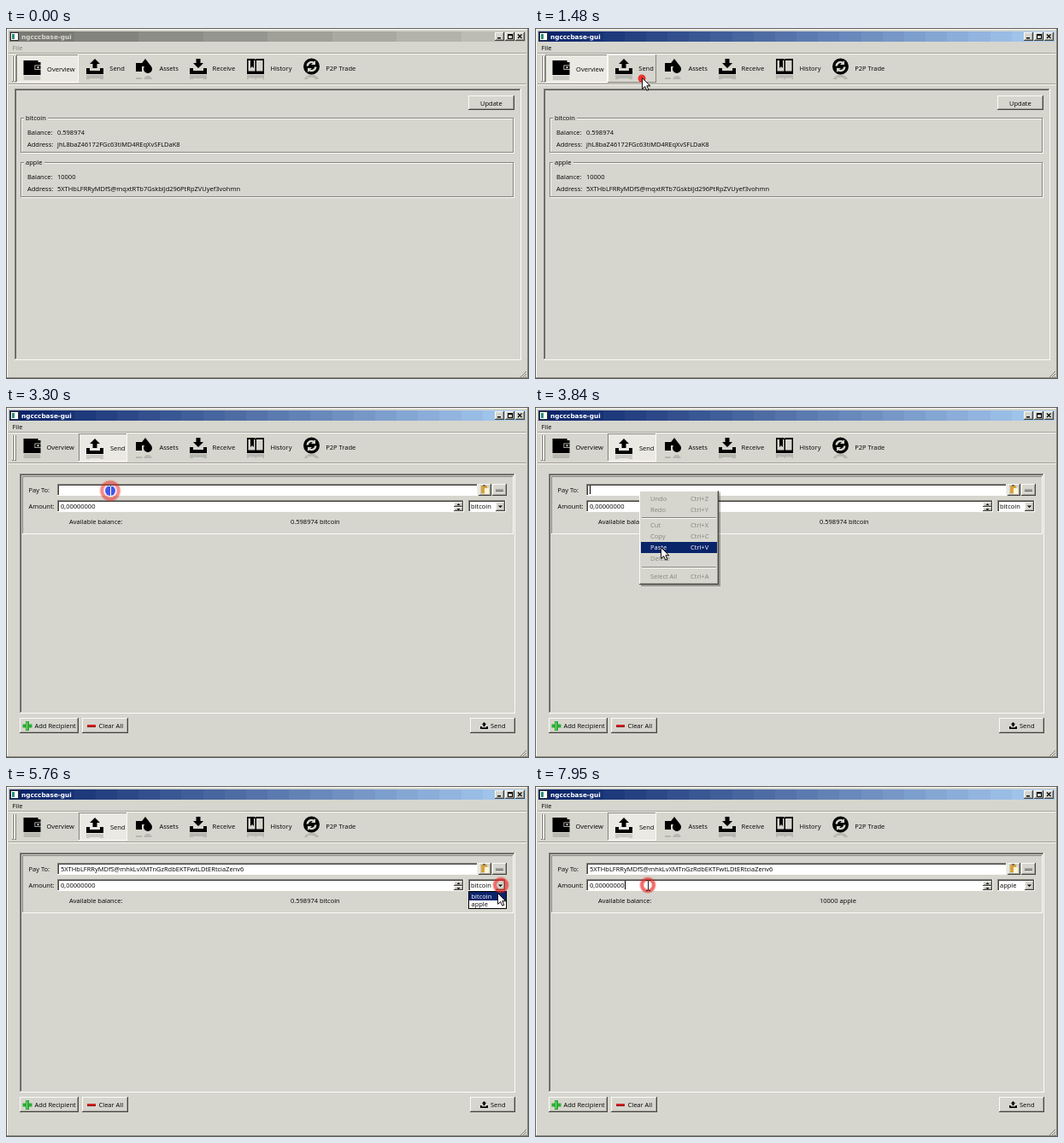
An HTML page with a canvas for the animation above (8000 ms loop, 612 by 411 pixels).

```html
<!DOCTYPE html>
<html lang="en">
<head>
<meta charset="utf-8">
<title>Wallet demo</title>
<style>
html, body { margin: 0; width: 100%; height: 100%; overflow: hidden; background: #d6d6ce; }
canvas { display: block; }
</style>
</head>
<body>
<canvas id="stage" width="612" height="411"></canvas>
<script>
const ctx = document.getElementById('stage').getContext('2d');
const LOOP = 8000;
const FACE = '#d6d6ce', DARK = '#85847d', LIGHT = '#fbfbf7', NAVY = '#0a246a', INK = '#000';
const FONT = '7.5px "Open Sans", "Noto Sans", sans-serif';
const TITLE_FONT = 'bold 7.3px "DejaVu Sans", sans-serif';

const ADDRESSES = {
  bitcoin: 'jhL8baZ46172FGc63tiMD4REqXvSFLDaK8',
  apple: '5XTHbLFRRyMDfS@mqxtRTb7GskbiJd296PtRpZVUyef3vohmn',
  payee: '5XTHbLFRRyMDfS@mhkLvXMTnGzRdbEKTFwtLDtERtciaZenv6'
};

// Moments at which the interface changes, in ms
const AT = { enter: 500, hover: 1160, activate: 1420, sendPage: 1540, menu: 3360,
  paste: 4160, popup: 5640, pick: 6640, amount: 7790 };

const TRAY = 'M0 11h4v3h12v-3h4v7H0z';
const ICONS = {
  wallet: 'M0 1h17v2h3v15H0z M13 6.5h7v.7h-6.2v4H20v.7h-7z M16 8.2h2v2h-2z',
  send: TRAY + 'M10 0L16 6H12.5V11H7.5V6H4z',
  assets: 'M0 5h7v10H0z M11 0l7 9H4z M9 12a5 5 0 0 1 10 0a5 5 0 0 1-10 0z',
  receive: TRAY + 'M7.5 0h5v5H16L10 11 4 5h3.5z',
  history: 'M0 0h9l1 1 1-1h9v18H0z M1.5 2h8v12.5h-8z M11 2h7.5v12.5H11z M4 2h4v9l-2-2-2 2z',
  trade: 'M0.5 9a9.5 9.5 0 0 1 19 0a9.5 9.5 0 0 1-19 0z' +
    'M4 8.5a6 6 0 0 1 9-5l1.5-1.5v5h-5l1.8-1.8a3.6 3.6 0 0 0-4.8 3.3z' +
    'M16 9.5a6 6 0 0 1-9 5l-1.5 1.5v-5h5l-1.8 1.8a3.6 3.6 0 0 0 4.8-3.3z'
};
const SOLID_ICONS = ['assets', 'send', 'receive'];
for (const name in ICONS) ICONS[name] = new Path2D(ICONS[name]);
const ARROW = new Path2D('M0 0V12.8L3.2 10 5.3 14.6 7.3 13.7 5.3 9.2H9.2z');

const TOOLS = [
  ['wallet', 20.5, 'Overview', 47.5], ['send', 94, 'Send', 121.3], ['assets', 152, 'Assets', 179.4],
  ['receive', 215, 'Receive', 241.6], ['history', 282, 'History', 309.4], ['trade', 347.5, 'P2P Trade', 374.3]
];

// Pointer stops: time, x, y
const PATH = [
  [500, 326, 384], [1220, 125, 58], [1900, 125, 58], [2200, 300, 76], [2560, 215, 106],
  [2900, 122, 98], [3500, 122, 98], [3900, 149, 168], [4480, 149, 168], [4560, 157, 165],
  [4740, 489, 120], [5160, 590, 124], [5460, 579, 116], [5600, 579, 116], [5760, 575, 125],
  [6120, 570, 134], [6560, 569, 135], [6860, 569, 135], [6920, 566, 136], [7160, 240, 148],
  [7560, 132, 116]
];

// Clicks: time, x, y, colour
const RED = '236,36,32', BLUE = '24,48,232';
const CLICKS = [
  [1420, 125, 59, RED], [2990, 122, 98, RED], [3180, 122, 98, BLUE], [4080, 149, 168, RED],
  [5560, 579, 116, RED], [6580, 569, 135, RED], [7750, 132, 116, RED]
];

function rect(x, y, w, h, color) {
  ctx.fillStyle = color;
  ctx.fillRect(x, y, w, h);
}

function text(label, x, y, color = INK, font = FONT) {
  ctx.font = font;
  ctx.fillStyle = color;
  ctx.fillText(label, x, y);
}

function bevel(x, y, w, h, topLeft, bottomRight, fill) {
  if (fill) rect(x, y, w, h, fill);
  rect(x, y, w, 1, topLeft);
  rect(x, y, 1, h, topLeft);
  rect(x, y + h - 1, w, 1, bottomRight);
  rect(x + w - 1, y, 1, h, bottomRight);
}

function button(x, y, w, h) {
  bevel(x, y, w, h, LIGHT, '#45443f', FACE);
  rect(x + 1, y + h - 2, w - 2, 1, '#a3a29b');
  rect(x + w - 2, y + 1, 1, h - 2, '#a3a29b');
}

function field(x, y, w, h) {
  bevel(x, y, w, h, DARK, LIGHT, '#fff');
  rect(x + 1, y + 1, w - 2, 1, '#44423f');
  rect(x + 1, y + 1, 1, h - 2, '#44423f');
}

function triangle(x, y, size, direction) {
  ctx.fillStyle = INK;
  ctx.beginPath();
  ctx.moveTo(x - size, y);
  ctx.lineTo(x + size, y);
  ctx.lineTo(x, y + size * direction);
  ctx.fill();
}

function icon(name, x, y, scale = 1) {
  ctx.save();
  ctx.translate(x, y);
  ctx.scale(scale, scale);
  ctx.fillStyle = INK;
  ctx.fill(ICONS[name], SOLID_ICONS.includes(name) ? 'nonzero' : 'evenodd');
  ctx.restore();
}

function reflectedIcon(name, x, y) {
  icon(name, x, y);
  ctx.save();
  ctx.beginPath();
  ctx.rect(x, y + 18, 20, 6);
  ctx.clip();
  ctx.globalAlpha = 0.14;
  ctx.translate(0, 2 * y + 37);
  ctx.scale(1, -1);
  icon(name, x, y);
  ctx.restore();
}

function titleBar(active) {
  const from = active ? [10, 36, 106] : [122, 122, 117];
  const to = active ? [166, 202, 240] : [188, 188, 180];
  const bands = active ? 24 : 8;
  for (let i = 0; i < bands; i++) {
    const p = i / (bands - 1);
    const mix = from.map((c, k) => Math.round(c + (to[k] - c) * p));
    const left = Math.round(4 + 604 * i / bands);
    rect(left, 4, Math.round(4 + 604 * (i + 1) / bands) - left, 12, `rgb(${mix})`);
  }
  bevel(5, 5, 10, 10, '#333', '#333', '#fff');
  rect(7, 7, 3, 6, '#2b8a78');
  text('ngcccbase-gui', 18, 12.8, active ? '#fff' : '#d8d6ce', TITLE_FONT);
  [572, 584, 596].forEach(x => button(x, 5, 11, 10));
  rect(575, 11, 4, 1.5, INK);
  bevel(587, 7, 6, 6, INK, INK);
  rect(587, 7, 6, 2, INK);
  ctx.strokeStyle = INK;
  ctx.lineWidth = 1.2;
  ctx.beginPath();
  ctx.moveTo(599, 7.5); ctx.lineTo(603.5, 12);
  ctx.moveTo(603.5, 7.5); ctx.lineTo(599, 12);
  ctx.stroke();
}

function windowFrame(t) {
  const active = t >= AT.activate;
  rect(0, 0, 612, 411, FACE);
  bevel(0, 0, 612, 411, '#5e5d59', '#5e5d59');
  bevel(1, 1, 610, 409, LIGHT, DARK);
  titleBar(active);
  text('File', 7.5, 26, active ? INK : DARK);
  for (const y of [29, 65]) {
    rect(3, y, 606, 1, '#a39c94');
    rect(3, y + 1, 606, 1, LIGHT);
  }
  bevel(7, 33, 2, 30, LIGHT, DARK);
  bevel(10, 33, 2, 30, LIGHT, DARK);
  ctx.strokeStyle = DARK;
  ctx.lineWidth = 1;
  for (let i = 0; i < 3; i++) {
    ctx.beginPath();
    ctx.moveTo(609, 402 + 3 * i);
    ctx.lineTo(602 + 3 * i, 409);
    ctx.stroke();
  }
}

function toolbar(t) {
  const checked = t >= AT.sendPage ? 1 : 0;
  if (checked) bevel(85, 31, 57, 33, DARK, LIGHT, '#ebe9e3');
  else bevel(12, 31, 73, 33, DARK, LIGHT, '#ebe9e3');
  if (!checked && t >= AT.hover) bevel(85, 31, 57, 33, LIGHT, DARK);
  TOOLS.forEach(([name, x, label, labelX], i) => {
    const shift = i === checked ? 1 : 0;
    reflectedIcon(name, x, 36 + shift);
    text(label, labelX + shift * 0.6, 50 + shift);
  });
}

function groupBox(y, name, balance) {
  bevel(18, y + 1, 577, 41, LIGHT, LIGHT);
  bevel(17, y, 577, 41, DARK, DARK);
  rect(21, y - 1, name === 'bitcoin' ? 28 : 24, 4, FACE);
  text(name, 23, y + 2.8);
  text('Balance:', 25, y + 20);
  text(balance, 60, y + 20);
  text('Address:', 25, y + 33.5);
  text(ADDRESSES[name], 60, y + 33.5);
}

function overviewPage() {
  bevel(10, 71, 593, 318, DARK, LIGHT);
  bevel(11, 72, 591, 316, '#5c5a56', FACE);
  button(541, 79, 54, 17);
  text('Update', 555, 91);
  groupBox(105, 'bitcoin', '0.598974');
  groupBox(157, 'apple', '10000');
}

function combo(t) {
  const asset = t >= AT.pick ? 'apple' : 'bitcoin';
  const focused = t >= AT.pick && t < AT.amount;
  field(541, 109, 44, 14);
  if (focused) rect(543, 111, 30, 11, NAVY);
  text(asset, 544, 119, focused ? '#fff' : INK);
  button(573, 111, 11, 11);
  triangle(578.5, 115.5, 2.6, 1);
  if (t >= AT.popup && t < AT.pick) {
    bevel(541, 123, 45, 21, INK, INK, '#fff');
    const onApple = t >= 6160;
    rect(542, onApple ? 133 : 124, 43, 10, NAVY);
    text('bitcoin', 544.5, 131.5, onApple ? INK : '#fff');
    text('apple', 544.5, 141, onApple ? '#fff' : INK);
  }
  text(asset === 'apple' ? '10000 apple' : '0.598974 bitcoin', 333, 137);
}

function carets(t) {
  const blinkOn = Math.floor((t - AT.sendPage - 20) / 530) % 2 === 0;
  ctx.font = FONT;
  if (t < AT.popup && blinkOn) {
    const typed = t >= AT.paste ? ctx.measureText(ADDRESSES.payee).width : 0;
    rect(Math.round(64 + typed), 92, 1, 10, INK);
  }
  if (t >= AT.amount) rect(105, 111, 1, 10, INK);
}

function contextMenu(t) {
  rect(124, 100, 93, 110, 'rgba(0,0,0,.3)');
  button(122, 98, 93, 110);
  const items = [['Undo', 'Ctrl+Z', 101], ['Redo', 'Ctrl+Y', 114], ['Cut', 'Ctrl+X', 132],
    ['Copy', 'Ctrl+C', 145], ['Paste', 'Ctrl+V', 158], ['Delete', '', 171], ['Select All', 'Ctrl+A', 192]];
  for (const [label, keys, y] of items) {
    const enabled = label === 'Paste';
    const selected = enabled && t >= 3740;
    if (selected) rect(124, y, 89, 13, NAVY);
    const color = selected ? '#fff' : enabled ? INK : DARK;
    text(label, 135, y + 9, color);
    text(keys, 182, y + 9, color);
  }
  for (const y of [129, 187]) {
    rect(125, y, 87, 1, DARK);
    rect(125, y + 1, 87, 1, LIGHT);
  }
}

function minus(x, y, w, color) {
  rect(x, y, w, 3, color);
  rect(x, y + 2, w, 1, 'rgba(0,0,0,.35)');
}

function sendPage(t) {
  bevel(16, 78, 580, 281, DARK, LIGHT);
  bevel(17, 79, 578, 279, '#5c5a56', FACE);
  bevel(19, 81, 575, 68, DARK, LIGHT);

  text('Pay To:', 26.5, 100);
  field(60, 90, 492, 14);
  if (t >= AT.paste) text(ADDRESSES.payee, 64, 100);
  button(553, 90, 15, 14);
  rect(556, 92, 7, 9, '#d9a23c');
  rect(558, 91, 3, 2, '#77736a');
  rect(560, 95, 5, 7, '#fff6d8');
  button(569, 90, 17, 14);
  minus(573, 96, 9, '#a3a19c');

  text('Amount:', 26.5, 119);
  field(60, 109, 476, 14);
  text('0,00000000', 64, 119);
  button(524, 111, 11, 6);
  button(524, 117, 11, 5);
  triangle(529.5, 115, 2, -1);
  triangle(529.5, 119, 2, 1);
  text('Available balance:', 74, 137);
  combo(t);
  carets(t);

  button(16, 364, 69, 18);
  rect(23, 368, 4, 11, '#2cab35');
  rect(19.5, 371.5, 11, 4, '#2cab35');
  rect(24, 369, 1, 9, '#7bdc78');
  text('Add Recipient', 33.5, 376);
  button(89, 364, 54, 18);
  minus(95, 372, 10, '#d42020');
  text('Clear All', 108.5, 376);
  button(543, 364, 53, 18);
  icon('send', 555, 369, 0.45);
  text('Send', 567, 376);
  if (t >= AT.menu && t < AT.paste) contextMenu(t);
}

function circle(x, y, radius) {
  ctx.beginPath();
  ctx.arc(x, y, radius, 0, 2 * Math.PI);
}

// A click starts as a solid dot, then widens into a fading ring.
function clickRings(t) {
  for (const [start, x, y, color] of CLICKS) {
    const age = t - start;
    if (age < 0 || age > 540) continue;
    const radius = 2 + age * 0.025;
    const alpha = 1 - 0.8 * age / 540;
    if (age < 140) {
      ctx.fillStyle = `rgba(${color},${alpha})`;
      circle(x, y, radius + 1);
      ctx.fill();
      continue;
    }
    for (const [width, strength] of [[6, 0.35], [3.5, 0.8]]) {
      ctx.strokeStyle = `rgba(${color},${alpha * strength})`;
      ctx.lineWidth = width;
      circle(x, y, radius);
      ctx.stroke();
    }
  }
}

function pointerAt(t) {
  const next = PATH.findIndex(stop => stop[0] > t);
  if (next < 0) return PATH[PATH.length - 1].slice(1);
  const [t0, x0, y0] = PATH[next - 1], [t1, x1, y1] = PATH[next];
  const p = (t - t0) / (t1 - t0), ease = p * p * (3 - 2 * p);
  return [x0 + (x1 - x0) * ease, y0 + (y1 - y0) * ease];
}

function pointer(t) {
  const [x, y] = pointerAt(t).map(Math.round);
  const inside = (left, top, right, bottom) => x >= left && x < right && y >= top && y < bottom;
  const menuOpen = t >= AT.menu && t < AT.paste;
  const overText = t >= AT.sendPage && !menuOpen &&
    (inside(60, 90, 553, 105) || inside(60, 109, 524, 124));
  if (overText || (t >= AT.pick && t < 6980)) {
    const color = t >= 3180 && t < AT.menu ? '#fff' : '#222';
    rect(x, y - 5, 1, 11, color);
    for (const end of [y - 6, y + 6]) {
      rect(x - 2, end, 2, 1, color);
      rect(x + 1, end, 2, 1, color);
    }
    return;
  }
  ctx.save();
  ctx.translate(x + 1.5, y + 1.5);
  ctx.fillStyle = 'rgba(0,0,0,.2)';
  ctx.fill(ARROW);
  ctx.translate(-1, -1);
  ctx.fillStyle = '#fff';
  ctx.fill(ARROW);
  ctx.strokeStyle = INK;
  ctx.lineWidth = 0.9;
  ctx.stroke(ARROW);
  ctx.restore();
}

function draw(now) {
  const t = now % LOOP;
  windowFrame(t);
  toolbar(t);
  if (t < AT.sendPage) overviewPage();
  else sendPage(t);
  clickRings(t);
  if (t >= AT.enter) pointer(t);
}

let startTime;
function tick(now) {
  startTime ??= now;
  draw(now - startTime);
  requestAnimationFrame(tick);
}
requestAnimationFrame(tick);
</script>
</body>
</html>
```
